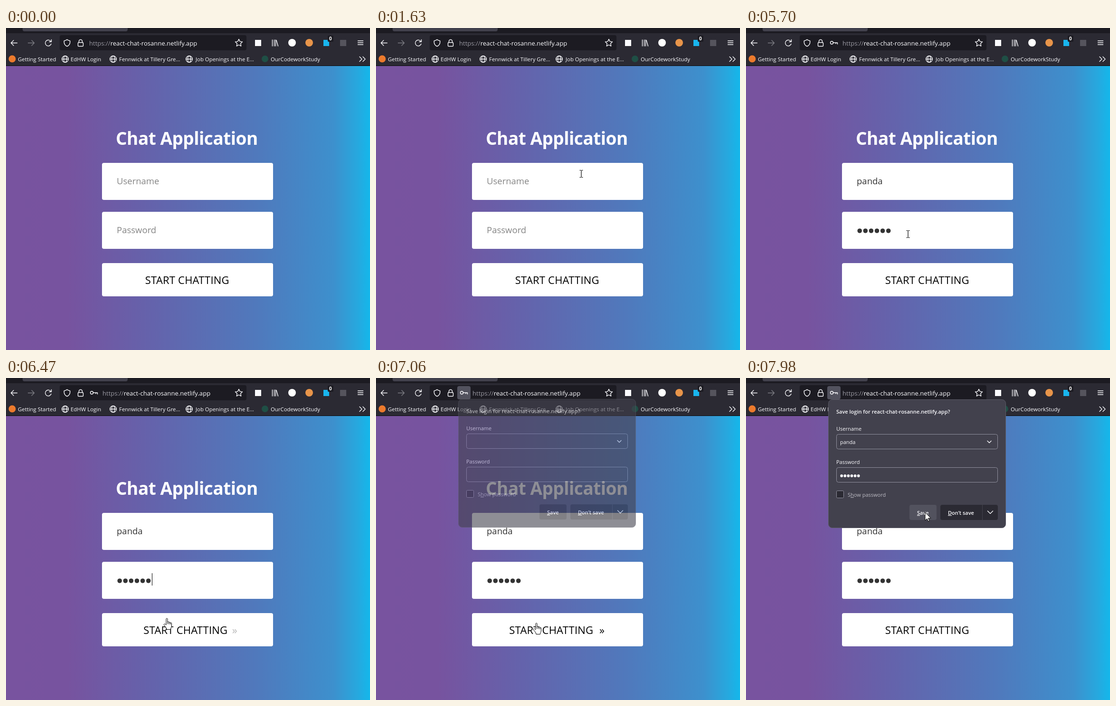
An HTML page that plays this animation: 766x678 px, repeating every 8 s.

```html
<!DOCTYPE html>
<html lang="en">
<head>
<meta charset="utf-8">
<title>Chat login</title>
<style>
  html, body { margin: 0; width: 100%; height: 100%; overflow: hidden; background: #2b2a33; }
  svg { display: block; width: 100vw; height: 100vh; font-family: "Open Sans", "Noto Sans", sans-serif; }
  text { white-space: pre; }
  .line { fill: none; stroke: #fbfbfe; stroke-width: 1.4; stroke-linecap: round; stroke-linejoin: round; }
  .small { font-size: 11.4px; fill: #fbfbfe; }
  .url { font-size: 13.1px; fill: #fbfbfe; }
  .field { font-size: 18.5px; fill: #333; }
  .hint { fill: #858585; }
  .action { font-size: 22px; letter-spacing: .2px; }
  .panel { font-size: 11px; fill: #fbfbfe; }
  .strong { font-weight: 600; }
  .key { text-decoration: underline; }
  .box { fill: #42414d; stroke: #8f8f9d; }
</style>
</head>
<body>
<svg viewBox="0 0 766 678">
  <defs>
    <linearGradient id="sky">
      <stop offset="0" stop-color="#78539f"/>
      <stop offset=".17" stop-color="#77539f"/>
      <stop offset=".39" stop-color="#6562ab"/>
      <stop offset=".53" stop-color="#5b6db3"/>
      <stop offset=".7" stop-color="#4f7abd"/>
      <stop offset=".9" stop-color="#3d90cd"/>
      <stop offset=".965" stop-color="#27a8de"/>
      <stop offset="1" stop-color="#14b7eb"/>
    </linearGradient>
    <g id="globe" class="line" stroke-width="1.2">
      <circle r="6.7"/><ellipse rx="3" ry="6.7"/><path d="M-6.5 0H6.5"/>
    </g>
  </defs>

  <!-- Browser window -->
  <rect width="766" height="80" fill="#2b2a33"/>
  <rect width="766" height="11" fill="#1c1b22"/>
  <rect x="35" y="-8" width="221" height="15" rx="4" fill="#42414d"/>
  <rect y="79" width="766" height="1" fill="#0c0c0d"/>
  <rect x="113" y="15" width="393" height="32" rx="4" fill="#1c1b22"/>
  <g class="line">
    <path d="M23.5 31.5H10.5M16 26L10.5 31.5L16 37"/>
    <path d="M46.5 31.5H59.5M54 26L59.5 31.5L54 37" opacity=".4"/>
    <path d="M94.5 28.5A6.3 6.3 0 1 0 95 33.5M95.5 24.5V29H91"/>
    <path d="M128.5 24.3C126.5 26 124.5 26.8 122.3 27V30C122.3 34 125 37 128.5 38.7C132 37 134.7 34 134.7 30V27C132.5 26.8 130.5 26 128.5 24.3Z"/>
    <rect x="151.5" y="30.5" width="11" height="8" rx="1.5"/>
    <path d="M153.5 30.5V28a3.5 3.5 0 0 1 7 0V30.5"/>
    <path d="M490 23.5l2.3 4.9 5.3.7-3.9 3.7 1 5.3-4.7-2.6-4.7 2.6 1-5.3-3.9-3.7 5.3-.7Z"/>
    <path d="M560.5 25V38M564.5 25V38M567.5 25V38M569 26L572.5 38"/>
    <path d="M740.5 27H751.5M740.5 31H751.5M740.5 35H751.5"/>
    <path d="M744 60.5l5 5-5 5M751 60.5l5 5-5 5"/>
  </g>
  <rect x="524" y="25" width="13" height="13" fill="#fbfbfe"/>
  <circle cx="602" cy="31" r="8" fill="#fff"/>
  <circle cx="638" cy="31" r="8" fill="#e8954a"/>
  <rect x="668" y="25" width="12" height="13" fill="#19b5ee"/>
  <rect x="677" y="16" width="12" height="13" rx="2" fill="#1c1b22"/>
  <text x="680" y="26" font-size="10" font-weight="700" fill="#fff">0</text>
  <rect x="703" y="25" width="13" height="13" fill="#55545d"/>

  <g id="keyIcon">
    <rect id="keyGlow" x="171" y="17" width="28" height="28" rx="4" fill="#52525e"/>
    <g class="line"><circle cx="180.5" cy="31" r="3"/><path d="M183.5 31H192.5V34M189 31V33"/></g>
  </g>
  <text id="url" class="url" y="37"><tspan fill="#9a99a2">https://</tspan>react-chat-rosanne.netlify.app</text>

  <circle cx="13" cy="65" r="7.5" fill="#ec7a2c"/>
  <use href="#globe" x="124.5" y="65.5"/>
  <use href="#globe" x="225.5" y="65.5"/>
  <use href="#globe" x="385.5" y="65.5"/>
  <circle cx="545" cy="65" r="7" fill="#1f4f45"/>
  <g class="small">
    <text x="25" y="70">Getting Started</text>
    <text x="136" y="70">EdHW Login</text>
    <text x="238" y="70">Fennwick at Tillery Gre...</text>
    <text x="399" y="70">Job Openings at the E...</text>
    <text x="557" y="70">OurCodeworkStudy</text>
  </g>

  <!-- Login page -->
  <rect y="80" width="766" height="598" fill="url(#sky)"/>
  <text x="231" y="246" font-size="37" font-weight="700" letter-spacing="-.5" fill="#fff">Chat Application</text>
  <g fill="#fff">
    <rect x="202" y="284" width="360" height="78" rx="4"/>
    <rect x="202" y="387" width="360" height="78" rx="4"/>
    <rect x="202" y="495" width="360" height="70" rx="4"/>
  </g>
  <text id="userHint" class="field hint" x="233" y="329">Username</text>
  <text id="userText" class="field" x="233" y="329"></text>
  <text id="passHint" class="field hint" x="233" y="432">Password</text>
  <g id="passDots" fill="#333"></g>
  <rect id="caret" width="1" height="26"/>
  <text id="startLabel" class="action" y="539">START CHATTING</text>
  <text id="startArrow" class="action" y="539">»</text>

  <!-- Save login panel -->
  <g id="panel">
    <rect x="173.5" y="45.5" width="373" height="270" rx="8" fill="#42414d" stroke="#5b5b66"/>
    <g class="panel">
      <text class="strong" x="190" y="75">Save login for react-chat-rosanne.netlify.app?</text>
      <text x="190" y="111">Username</text>
      <rect class="box" x="190.5" y="118.5" width="339" height="31" rx="4"/>
      <text x="190" y="181">Password</text>
      <rect class="box" x="190.5" y="188.5" width="339" height="31" rx="4"/>
      <g id="saved"><text x="198" y="139">panda</text></g>
      <rect x="190.5" y="237.5" width="15" height="15" rx="2" fill="#2b2a33" stroke="#8f8f9d"/>
      <text x="214" y="250" fill="#bdbcc4">S<tspan class="key">h</tspan>ow password</text>
      <rect id="saveButton" x="344" y="267" width="57" height="32" rx="4"/>
      <path d="M413 267H497V299H413a4 4 0 0 1-4-4V271a4 4 0 0 1 4-4ZM498 267H526a4 4 0 0 1 4 4V295a4 4 0 0 1-4 4H498Z" fill="#2b2a33"/>
      <text class="strong" x="360" y="288"><tspan class="key">S</tspan>ave</text>
      <text class="strong" x="425" y="288"><tspan class="key">D</tspan>on’t save</text>
    </g>
    <path class="line" d="M508 132.5l4 4 4-4M508.5 280l5.5 5.5 5.5-5.5"/>
  </g>

  <!-- Pointer -->
  <g id="pointer">
    <circle id="press" cx="-2" cy="-1" r="12" fill="#ff0" fill-opacity=".47"/>
    <path id="arrow" d="M0 0V17L4 13.2L6.6 19L9 18L6.4 12.2H12Z" fill="#fff" stroke="#000"/>
    <path id="beam" d="M-3.5-7.5H-.5M.5-7.5H3.5M0-7V7M-3.5 7.5H-.5M.5 7.5H3.5" stroke="#000" stroke-width="1.2"/>
    <path id="hand" d="M-1 1.5C-1-.5 2-.5 2 1.5V8C2 6.5 5 6.5 5 8.5V10C5 7.5 8 7.5 8 9.5V11C8 8.5 10.5 8.5 10.5 11V16C10.5 19 8.5 20 8.5 23.5H0C0 20-3 18-5.5 14C-6.5 12-4 11-2.5 12.5L-1 14ZM2 8V12M5 10V12.5M8 11V13" fill="#fff" stroke="#000"/>
  </g>
</svg>

<script>
const LOOP = 8000;
const USER = "panda";
const userKeys = [1710, 1940, 2120, 2300, 2400];
const passKeys = [4300, 4530, 4640, 5200, 5350, 5570];
const userCaret = [[1120, 1630], [1710, 2660], [3160, 3580]];
const passCaret = [[3620, 4120], [4300, 5120], [5200, 5700], [6200, 6700]];
const presses = [[1030, 1270], [3600, 3710], [6750, 6880]];

// Pointer route: time, x, y
const route = [
  [130, 634, 640], [300, 585, 612], [400, 540, 582], [480, 505, 520], [560, 445, 390],
  [660, 420, 290], [740, 425, 249], [850, 432, 307],
  [3040, 432, 307], [3200, 425, 330], [3350, 395, 400], [3480, 360, 455], [3600, 341, 434],
  [6160, 341, 434], [6260, 342, 465], [6370, 340, 494], [6500, 338, 510], [6700, 337, 516],
  [7440, 337, 516], [7480, 350, 494], [7600, 385, 440], [7700, 405, 390],
  [7800, 400, 330], [7900, 385, 295], [7980, 377, 283]
];

const el = {};
document.querySelectorAll("svg [id]").forEach(node => el[node.id] = node);

const clamp = x => Math.min(1, Math.max(0, x));
const show = (node, on) => node.setAttribute("visibility", on ? "inherit" : "hidden");
const within = (spans, t) => spans.some(([from, to]) => t >= from && t < to);
const countBefore = (times, t) => times.filter(time => t >= time).length;
const inside = (p, x, y, w, h) => p.x >= x && p.x < x + w && p.y >= y && p.y < y + h;

function bezier(x1, y1, x2, y2) {
  const at = (a, b, s) => 3 * a * s * (1 - s) ** 2 + 3 * b * s * s * (1 - s) + s ** 3;
  return x => {
    if (x <= 0 || x >= 1) return clamp(x);
    let low = 0, high = 1;
    for (let i = 0; i < 16; i++) {
      const mid = (low + high) / 2;
      if (at(x1, x2, mid) < x) low = mid; else high = mid;
    }
    return at(y1, y2, low);
  };
}
const ease = bezier(.25, .1, .25, 1);
const easeOut = bezier(0, 0, .58, 1);

function addDots(parent, x, y, step, r) {
  for (let i = 0; i < passKeys.length; i++) {
    const dot = document.createElementNS("http://www.w3.org/2000/svg", "circle");
    dot.setAttribute("cx", x + i * step);
    dot.setAttribute("cy", y);
    dot.setAttribute("r", r);
    parent.append(dot);
  }
}
addDots(el.passDots, 239.2, 427, 12.1, 4.8);
addDots(el.saved, 201.2, 206, 7.1, 2.9);

function pointerAt(t) {
  const next = route.findIndex(stop => stop[0] > t);
  if (next < 1) {
    const [, x, y] = next ? route[route.length - 1] : route[0];
    return { x, y };
  }
  const [t0, x0, y0] = route[next - 1], [t1, x1, y1] = route[next];
  const k = (t - t0) / (t1 - t0);
  return { x: x0 + (x1 - x0) * k, y: y0 + (y1 - y0) * k };
}

function drawPointer(t) {
  const p = pointerAt(t);
  const onPanel = t > 7000 && inside(p, 173, 45, 374, 271);
  const onText = !onPanel && (inside(p, 202, 284, 360, 78) || inside(p, 202, 387, 360, 78)
    || inside(p, 231, 210, 300, 50));
  const onButton = inside(p, 202, 495, 360, 70);
  show(el.pointer, t >= route[0][0]);
  el.pointer.setAttribute("transform", `translate(${Math.round(p.x)} ${Math.round(p.y)})`);
  show(el.beam, onText);
  show(el.hand, onButton);
  show(el.arrow, !onText && !onButton);
  show(el.press, within(presses, t));
  el.saveButton.setAttribute("fill", onPanel && inside(p, 344, 267, 57, 32) ? "#52525e" : "#2b2a33");
}

function drawForm(t) {
  const typed = countBefore(userKeys, t), dots = countBefore(passKeys, t);
  el.userText.textContent = USER.slice(0, typed);
  show(el.userHint, !typed);
  show(el.passHint, !dots);
  [...el.passDots.children].forEach((dot, i) => show(dot, i < dots));

  const inUser = within(userCaret, t);
  show(el.caret, inUser || within(passCaret, t));
  const advance = inUser ? (typed ? el.userText.getComputedTextLength() : 0) : dots * 12.1;
  el.caret.setAttribute("x", Math.round(234 + advance));
  el.caret.setAttribute("y", inUser ? 308 : 411);

  const brush = .14 * clamp(Math.min((t - 422) / 73, (565 - t) / 70));
  const hover = brush + ease((t - 6375) / 500) - ease((t - 7480) / 500);
  el.startLabel.setAttribute("x", 292.8 - 12.5 * hover);
  el.startArrow.setAttribute("x", 478 - 8 * hover);
  el.startArrow.setAttribute("opacity", hover);
}

function drawBrowser(t) {
  const hasKey = t >= passKeys[0];
  show(el.keyIcon, hasKey);
  show(el.keyGlow, t >= 6980);
  el.url.setAttribute("x", hasKey ? 203 : 175);

  const fade = easeOut((t - 6990) / 170);
  el.panel.setAttribute("opacity", fade);
  el.panel.setAttribute("transform", `translate(0 ${fade < 1 ? -1 : 0})`);
  show(el.panel, fade > 0);
  show(el.saved, t >= 7110);
}

function frame(now) {
  const t = now % LOOP;
  drawBrowser(t);
  drawForm(t);
  drawPointer(t);
  requestAnimationFrame(frame);
}
frame(0);
</script>
</body>
</html>
```
